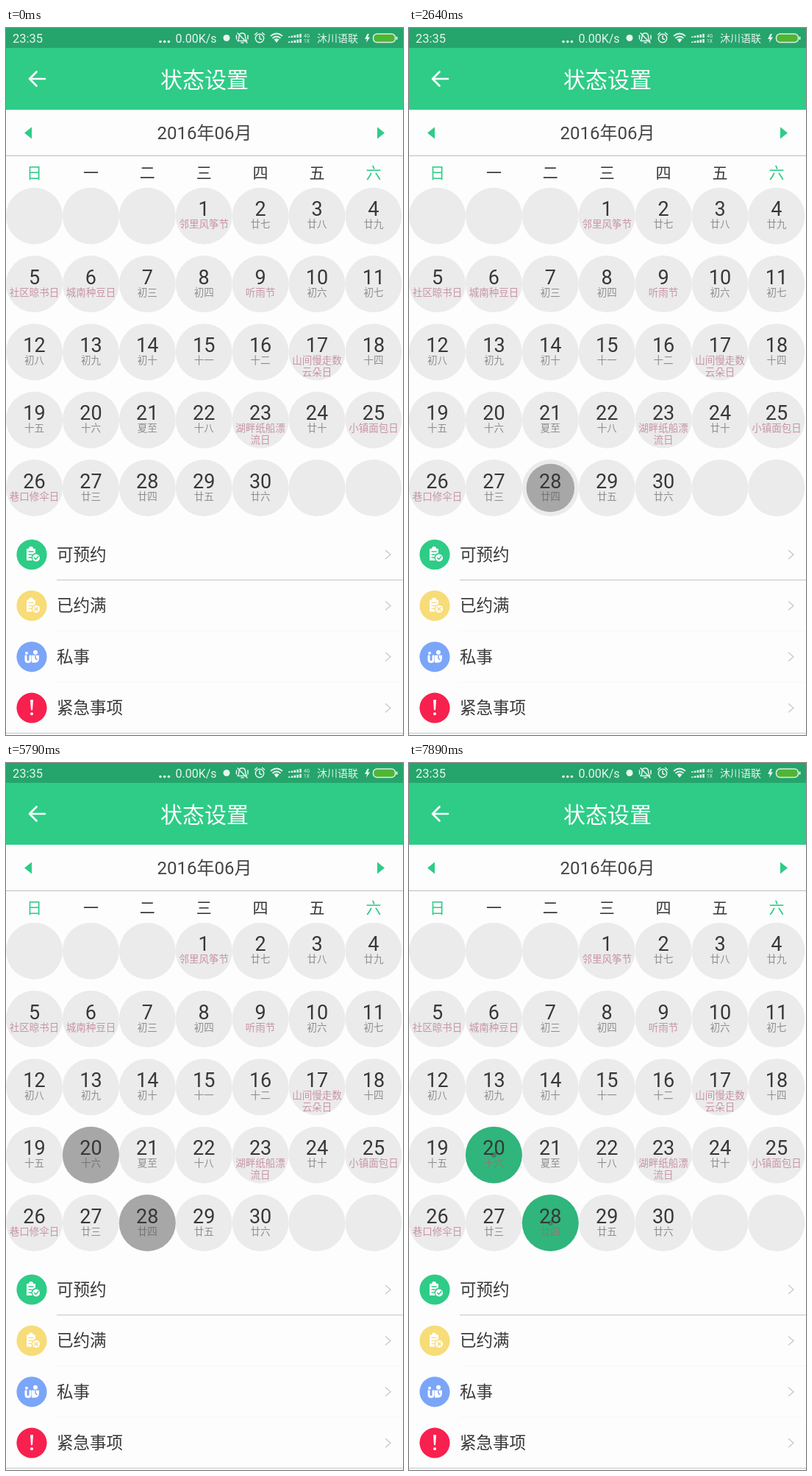
An HTML page for the animation above (7990 ms loop, 540 px wide and 960 px high).

```html
<!DOCTYPE html>
<html lang="zh">
<head>
<meta charset="utf-8">
<title>状态设置</title>
<style>
html, body { margin: 0; width: 100%; height: 100%; overflow: hidden; background: #fdfdfd; }
svg { display: block; width: 100%; height: 100%; }
text { font-family: Roboto, "Noto Sans CJK SC", "Noto Sans CJK", sans-serif; }
.mid { text-anchor: middle; }
.line { fill: none; stroke: #fff; stroke-linecap: round; stroke-linejoin: round; }
</style>
</head>
<body>
<svg id="stage" viewBox="0 0 540 960" xmlns="http://www.w3.org/2000/svg">
  <defs><clipPath id="rowClip"><rect y="680.5" width="540" height="69"/></clipPath></defs>
  <rect width="540" height="960" fill="#fdfdfd"/>
  <rect width="540" height="111" fill="#2ecc87"/>
  <rect width="540" height="27" fill="#25a46c"/>

  <g id="status" fill="#e6f5ee">
    <circle cx="210" cy="18.5" r="1.8"/><circle cx="215.7" cy="18.5" r="1.8"/><circle cx="221.4" cy="18.5" r="1.8"/>
    <circle cx="300" cy="13.5" r="4.5"/>
    <g class="line" stroke-width="1.5" style="stroke:#e6f5ee">
      <path d="M315 17.5h12.5c-2-2-2-4-2-6 0-6-8.500-6-8.500 0 0 2 0 4-2 6M320 20h3M315 7l13 13M313.500 10v5M329 10v5"/>
      <circle cx="345" cy="14" r="5.7"/><path d="M345 10.5v4l2.500 1M338.500 9l3-2.500M351.500 9l-3-2.500"/>
    </g>
    <path d="M368 20l-3.500-4.500q3.500-2.500 7 0z"/>
    <g class="line" stroke-width="1.7" style="stroke:#e6f5ee">
      <path d="M363 13.5q5-4 10 0M360.500 10.500q7.500-6 15 0"/>
    </g>
    <path d="M491.500 8l-3.500 7h3l-1 5 5-7.500h-3l2-4.500z"/>
    <rect x="499.5" y="8" width="30" height="11.5" rx="5" fill="#50b534" stroke="#d9f0e2" stroke-width="1.5"/>
    <rect x="530.5" y="11.5" width="2" height="4.5" rx="1"/>
  </g>

  <path class="line" stroke-width="2.7" d="M32 69H53M41.500 59.500L32 69L41.500 78.500"/>
  <path fill="#2ecc87" d="M25 142.500L35 134.500V150.500ZM515 142.500L505 134.500V150.500Z"/>
  <path stroke="#bcbebd" d="M0 173.500H540"/>

  <g id="cells"></g>
  <g id="marks"></g>
  <g id="labels"></g>

  <g id="rows"></g>
  <circle id="ripple" cx="235" cy="715" fill="#85e3bb" fill-opacity=".35" clip-path="url(#rowClip)"/>
  <path stroke="#c3c5c4" d="M69 749.500H540"/>
  <path stroke="#f7f7f7" d="M69 818.500H540M69 888.500H540"/>
  <path stroke="#c3c5c8" d="M0 957.500H540"/>
</svg>
<script>
const LOOP = 7990, R = 38.5;
const INK = '#383838', GREEN = '#2ecc87', NOTE = '#8e8e8e', EVENT = '#c794a6';
const $ = id => document.getElementById(id);

function add(parent, tag, attrs, content) {
  const el = document.createElementNS('http://www.w3.org/2000/svg', tag);
  for (const k in attrs) el.setAttribute(k, attrs[k]);
  if (content) el.textContent = content;
  parent.appendChild(el);
  return el;
}
const label = (parent, str, x, y, size, fill, mid = true) =>
  add(parent, 'text', { x, y, 'font-size': size, fill, class: mid ? 'mid' : '' }, str);

const cellX = col => 38.5 + col * 76.9;
const cellY = row => 255.3 + row * 92.3;

// Status bar and header
const bar = $('status'), pale = '#e6f5ee';
label(bar, '23:35', 9, 20, 16.5, pale, false);
label(bar, '0.00K/s', 230.5, 20, 16, pale, false);
label(bar, '沐川语联', 423, 19, 14, pale, false);
label(bar, '4G', 405, 12.5, 6.5, pale, false);
label(bar, '1X', 405, 19.5, 6.5, pale, false);
for (let i = 0; i < 5; i++)
  for (const base of [13, 20]) {
    const h = 1.5 + i * 0.9;
    add(bar, 'rect', { x: 384 + i * 3.8, y: base - h, width: 2.6, height: h });
  }
const cells = $('cells'), labels = $('labels');
label(labels, '状态设置', 270, 80.5, 30, '#fff');
label(labels, '2016年06月', 270, 151, 24, '#444');
[...'日一二三四五六'].forEach((d, i) =>
  label(labels, d, cellX(i), 203.8, 21, i % 6 ? INK : GREEN));

// Calendar
const lunar = ('|廿七|廿八|廿九|||初三|初四||初六|初七|初八|初九|初十|十一|十二||十四|' +
  '十五|十六|夏至|十八||廿十|||廿三|廿四|廿五|廿六').split('|');
const events = {
  1: '邻里风筝节', 5: '社区晾书日', 6: '城南种豆日', 9: '听雨节',
  17: '山间慢走数云朵日', 23: '湖畔纸船漂流日', 25: '小镇面包日', 26: '巷口修伞日'
};
for (let i = 0; i < 35; i++)
  add(cells, 'circle', { cx: cellX(i % 7), cy: cellY(Math.floor(i / 7)), r: R, fill: '#ebebeb' });

const notes = {};
for (let day = 1; day <= 30; day++) {
  const i = day + 2, x = cellX(i % 7), y = cellY(Math.floor(i / 7));
  label(labels, day, x, y, 27, INK);
  const event = events[day];
  if (event) {
    label(labels, event.slice(0, 5), x, y + 16, 13.5, EVENT);
    label(labels, event.slice(5), x, y + 32, 13.5, EVENT);
  } else {
    notes[day] = label(labels, lunar[day - 1], x, y + 16, 13.5, NOTE);
  }
}

// Option rows
const board = '<path fill="#fff" d="M-7-8h3q0-3 3-3t3 3h3v6a6 6 0 0 0-4 10h-8z"/>';
const badge = sign => board +
  '<path class="line" stroke-width="1.3" style="stroke:COLOR" d="M-4-4h6M-4 0h4M-4 4h3"/>' +
  '<circle cx="6" cy="4.5" r="5" fill="#fff"/>' +
  `<path class="line" stroke-width="1.5" style="stroke:COLOR" d="${sign}"/>`;
const people = '<g fill="#fff"><circle cx="-7" cy="-5" r="2"/><circle cx="5" cy="-6" r="3"/>' +
  '<path d="M0-2h10v4q0 6-6 6h-4z"/></g>' +
  '<path class="line" stroke-width="3" d="M-8-1v5q0 3 3 3t3-3v-5"/>' +
  '<path class="line" stroke-width="1.5" style="stroke:COLOR" d="M5-1v3l2 2"/>';
const alertSign = '<path fill="#fff" d="M-2-11h4l-1 14h-2z"/><circle cy="8" r="2" fill="#fff"/>';
const options = [
  ['可预约', GREEN, badge('M3.5 4.5l2 2 3.500-4')],
  ['已约满', '#f7dc78', badge('M4 2.5l4 4M8 2.500l-4 4')],
  ['私事', '#7ba5f8', people],
  ['紧急事项', '#f8204e', alertSign]
];
options.forEach(([name, color, art], i) => {
  const y = 715 + i * 69.4;
  const icon = add($('rows'), 'g', { transform: `translate(35 ${y})` });
  icon.innerHTML = `<circle r="20.6" fill="${color}"/>` + art.replaceAll('COLOR', color);
  label($('rows'), name, 69, y + 8, 22.5, INK, false);
  add($('rows'), 'path', {
    d: `M516 ${y - 6}L523 ${y}L516 ${y + 6}`, fill: 'none', stroke: '#c8c8c8', 'stroke-width': 1.3
  });
});

// Animated selection
const picks = [[28, 2410], [20, 4090]].map(([day, start]) => {
  const i = day + 2, pos = { cx: cellX(i % 7), cy: cellY(Math.floor(i / 7)) };
  return {
    start, note: notes[day],
    disc: add($('marks'), 'circle', pos),
    core: add($('marks'), 'circle', pos)
  };
});
const ripple = $('ripple');
const lerp = (a, b, u) => a + (b - a) * u;
const part = (t, from, to) => Math.min(1, Math.max(0, (t - from) / (to - from)));
const blend = (a, b, u) => `rgb(${a.map((v, i) => Math.round(lerp(v, b[i], u)))})`;
const GREY = [167, 167, 167], DEEP = [42, 125, 90];

function popScale(t) {
  if (t < 0) return 0;
  return t < 1350 ? lerp(0.8, 1.095, t / 1350) : lerp(1.095, 1, part(t, 1350, 1690));
}

function draw(t) {
  const done = t >= 6830, u = part(t, 6830, 8000);
  for (const p of picks) {
    p.disc.setAttribute('r', R * popScale(t - p.start));
    p.disc.setAttribute('fill', done ? '#30b57c' : blend(GREY, DEEP, 0));
    p.core.setAttribute('r', done ? R * (1 - u) : 0);
    p.core.setAttribute('fill', blend(GREY, DEEP, u * u));
    p.note.setAttribute('fill', done ? '#8f7a70' : t >= p.start ? '#747474' : NOTE);
  }
  ripple.setAttribute('r', t < 6810 ? 271 * part(t, 6030, 6770) : 0);
}

const begin = performance.now();
function tick() {
  draw((performance.now() - begin) % LOOP);
  requestAnimationFrame(tick);
}
tick();
</script>
</body>
</html>
```
